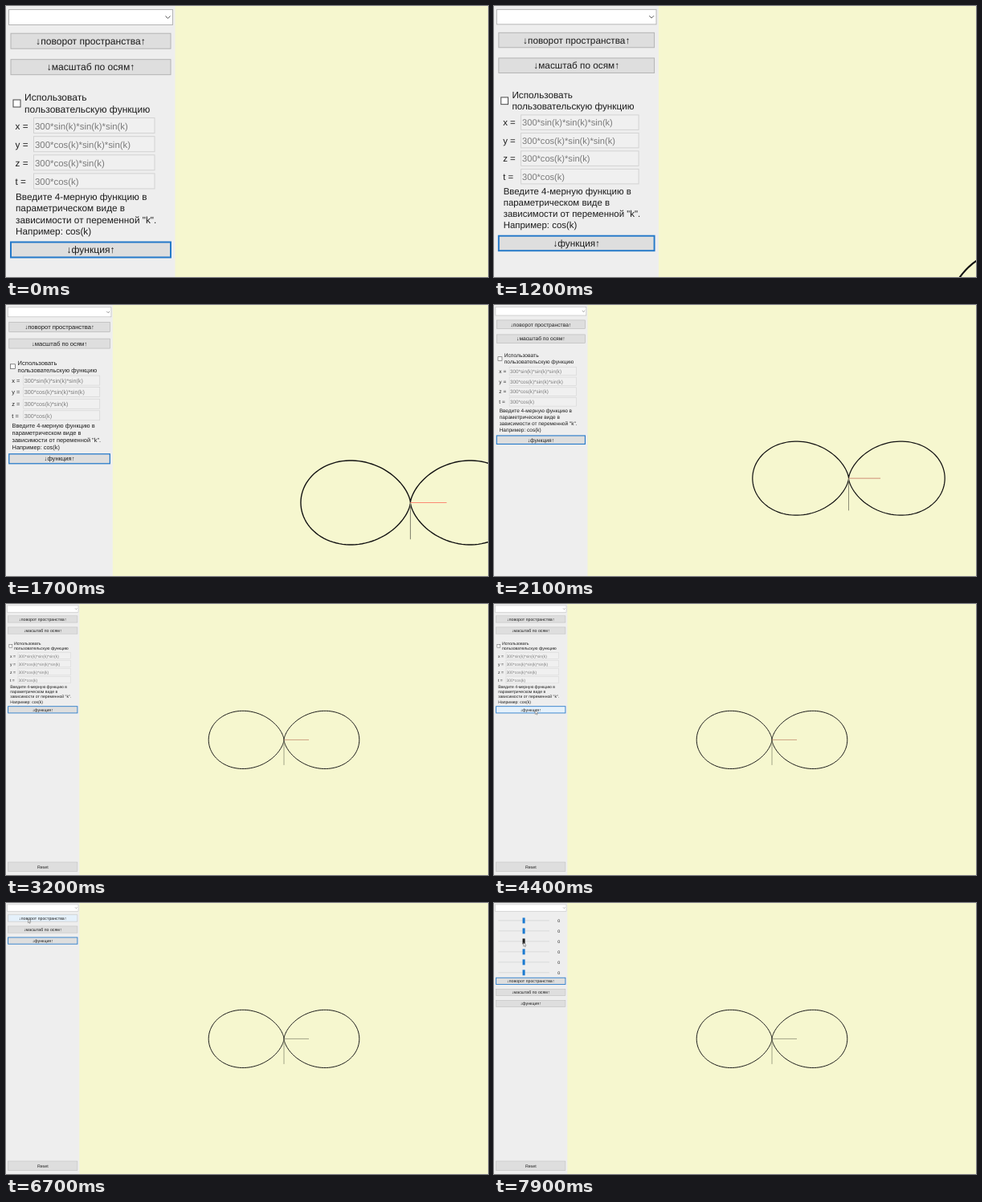
An HTML page that plays this animation: 600x338 px, repeating every 8 s.

```html
<!DOCTYPE html>
<html lang="ru">
<head>
<meta charset="utf-8">
<title>Lemniscate panel</title>
<style>
  html, body { margin: 0; width: 100%; height: 100%; overflow: hidden; background: #f6f7cf; }
  svg { display: block; width: 600px; height: 338px; }
  text { font-family: "Liberation Sans", Arial, sans-serif; fill: #1c1c1c; text-rendering: geometricPrecision; }
  .box { fill: #fff; stroke: #b4b4b4; }
  .btn rect { fill: #dedede; stroke: #b2b2b2; }
  .btn.hover rect { fill: #e5f1fb; }
  .btn.focus rect { stroke: #2479c9; stroke-width: 2; }
  .btn text { font-size: 12.1px; text-anchor: middle; }
  .field { fill: #f0f0f0; stroke: #d2d2d2; }
  .formula { font-size: 11.4px; fill: #7a7a7a; }
  .check { font-size: 12.05px; }
  .hint { font-size: 11.75px; }
  .curve { fill: none; stroke: #111; stroke-width: 2.2; }
  .axis { fill: none; stroke-width: 1.7; }
  .track { stroke: #d6d8d8; stroke-width: 2; }
  .thumb { fill: #1c7ad0; }
  .thumb.hover { fill: #1a1a1a; }
  .mouse { fill: #fff; stroke: #444; stroke-width: 1; stroke-linejoin: round; }
</style>
</head>
<body>
<svg viewBox="0 0 600 338"><g id="view"></g></svg>
<script>
const LOOP = 8000, STEP = 100;
const BIG = 2.306; // the window is laid out at its largest zoom
const FOLD = 5100, UNFOLD = 6900;

const view = document.getElementById('view');

function add(parent, tag, attrs, text) {
  const el = document.createElementNS('http://www.w3.org/2000/svg', tag);
  for (const k in attrs) el.setAttribute(k, attrs[k]);
  if (text) el.textContent = text;
  return parent.appendChild(el);
}
const group = cls => add(view, 'g', { class: cls || '' });
const label = (parent, x, mid, str, cls) =>
  add(parent, 'text', { x, y: mid + 4.2, class: cls || '' }, str);
const rect = (parent, x, y, width, height, cls) =>
  add(parent, 'rect', { x, y, width, height, class: cls });

// Plot: r = a cos²θ
const cx = 346 * BIG, cy = 169.4 * BIG, a = 93.8 * BIG;
let d = '';
for (let i = 0; i <= 240; i++) {
  const k = i / 240 * 2 * Math.PI, r = a * Math.cos(k) ** 2;
  d += `${i ? 'L' : 'M'}${(cx + r * Math.cos(k)).toFixed(2)} ${(cy + r * Math.sin(k)).toFixed(2)}`;
}
add(view, 'path', { d, class: 'curve' });
add(view, 'path', { d: `M${cx} ${cy}v${31.5 * BIG}`, class: 'axis', stroke: '#85866f' });
const axisX = add(view, 'path', { d: `M${cx} ${cy}h${31 * BIG}`, class: 'axis' });

// Side panel
add(view, 'rect', { width: 210.5, height: 800, fill: '#eeeeee' });
rect(view, 3.5, 4.5, 204, 19, 'box');
add(view, 'path', { d: 'M198.5 12.5l3 3l3-3', fill: 'none', stroke: '#555' });

function button(str, height = 19) {
  const g = group('btn');
  rect(g, 6, -height / 2, 199, height, '');
  label(g, 105.5, 0, str);
  return {
    place(y) { this.y = y; g.setAttribute('transform', `translate(0 ${y})`); },
    mark(focus, x, y) {
      g.classList.toggle('focus', focus);
      g.classList.toggle('hover', x > 6 && x < 205 && Math.abs(y - this.y) < height / 2);
    }
  };
}
const turn = button('↓поворот пространства↑');
const scale = button('↓масштаб по осям↑');
const func = button('↓функция↑');
const reset = button('Reset', 27);
reset.place(756);

const form = group();
rect(form, 9, 117, 9, 9, 'box').style.stroke = '#444';
label(form, 23, 114, 'Использовать', 'check');
label(form, 23, 128.3, 'пользовательскую функцию', 'check');
['x', 'y', 'z', 't'].forEach((name, i) => {
  const y = 149.3 + 23.1 * i;
  label(form, 11.5, y, name + ' =', 'hint');
  rect(form, 34.5, y - 9.7, 150.5, 19, 'field');
  label(form, 36, y, '300*' + ['sin(k)*sin(k)*sin(k)', 'cos(k)*sin(k)*sin(k)', 'cos(k)*sin(k)', 'cos(k)'][i], 'formula');
});
['Введите 4-мерную функцию в', 'параметрическом виде в', 'зависимости от переменной "k".', 'Например: cos(k)']
  .forEach((line, i) => label(form, 12, 237.6 + 14.4 * i, line, 'hint'));

const sliders = group();
const thumbs = [0, 1, 2, 3, 4, 5].map(i => {
  const y = 50.5 + 29.95 * i;
  add(sliders, 'path', { d: `M12 ${y}H159`, class: 'track' });
  label(sliders, 183, y + .5, '0', 'hint');
  return { y, el: rect(sliders, 82, y - 8, 7, 16, 'thumb') };
});

const mouse = add(view, 'path', { d: 'M0 0V11L2.6 8.7L4.4 12.6L6 11.9L4.3 8.1H7.8Z', class: 'mouse' });

// Monotone cubic through [time, value, ...] rows
function track(rows, t, col = 1) {
  const last = rows.length - 1;
  if (t <= rows[0][0]) return rows[0][col];
  if (t >= rows[last][0]) return rows[last][col];
  const i = rows.findIndex(r => r[0] > t) - 1;
  const rise = j => j < 0 || j >= last ? 0 : (rows[j + 1][col] - rows[j][col]) / (rows[j + 1][0] - rows[j][0]);
  const slope = j => {
    const p = rise(j - 1), q = rise(j);
    return p * q > 0 ? 2 * p * q / (p + q) : 0;
  };
  const h = rows[i + 1][0] - rows[i][0], u = (t - rows[i][0]) / h, v = 1 - u;
  return v * v * (1 + 2 * u) * rows[i][col] + u * u * (3 - 2 * u) * rows[i + 1][col]
    + h * u * v * (v * slope(i) - u * slope(i + 1));
}
const zoom = [[900, 2.306], [1200, 2.245], [1700, 1.455], [2100, 1.276], [2500, 1]];
const path = [
  [3300, 560, 150], [4000, 110, 140], [4600, 40, 131], [5100, 34, 131], [5500, 29.5, 92.5],
  [5900, 28, 45], [6300, 27.5, 20], [7200, 27.5, 20], [7700, 36.7, 49.3]
];
const show = (el, on) => el.setAttribute('visibility', on ? 'visible' : 'hidden');

function draw(t) {
  view.setAttribute('transform', `scale(${track(zoom, t) / BIG})`);
  const folded = t >= FOLD, turning = t >= UNFOLD;
  const top = turning ? 224.5 : 43.7;
  turn.place(top);
  scale.place(top + 32.5);
  func.place(folded ? top + 64.8 : 304);
  show(form, !folded);
  show(sliders, turning);

  const seen = t >= path[0][0];
  const x = track(path, t, 1) * BIG, y = track(path, t, 2) * BIG;
  show(mouse, seen);
  mouse.setAttribute('transform', `translate(${x} ${y})`);
  const mx = seen ? x : -1;
  turn.mark(turning, mx, y);
  scale.mark(false, mx, y);
  func.mark(!turning, mx, y);
  for (const k of thumbs)
    k.el.classList.toggle('hover', turning && Math.abs(mx - 85.5) < 4 && Math.abs(y - k.y) < 9);

  axisX.setAttribute('stroke', t < 2000 ? '#fb8a74' : t < 2900 ? '#cc8870' : t < 4900 ? '#bd8468' : '#85866f');
}

function tick() {
  draw(Math.floor(performance.now() % LOOP / STEP) * STEP);
  requestAnimationFrame(tick);
}
tick();
</script>
</body>
</html>
```
